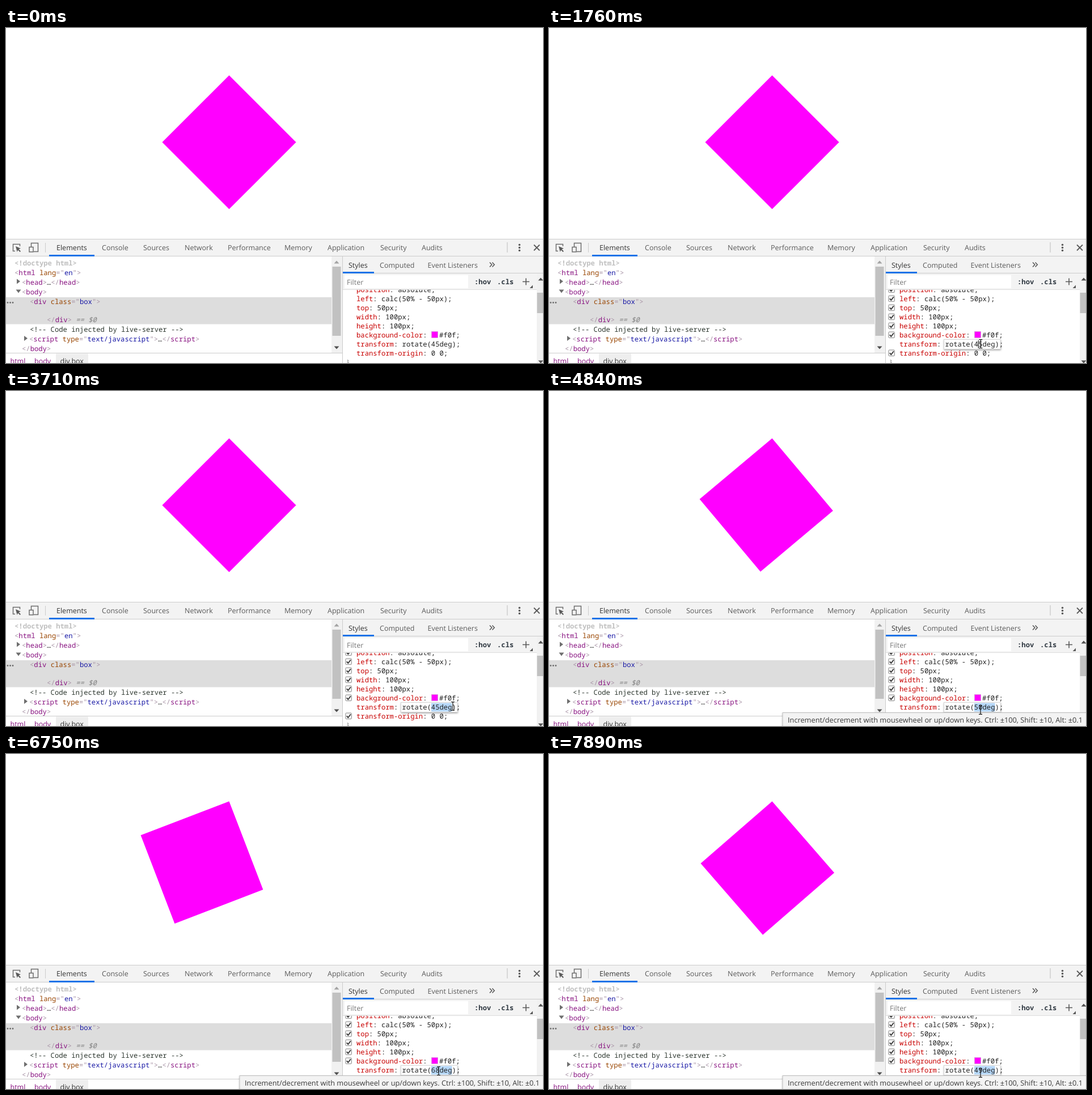
Write an HTML page that moves like this. It is 947 by 591 pixels and loops after 8 s.

```html
<!DOCTYPE html>
<html lang="en">
<head>
<meta charset="utf-8">
<style>
html, body { margin: 0; width: 100%; height: 100%; overflow: hidden; background: #fff; }
svg { display: block; width: 947px; height: 591px; }
text { white-space: pre; text-rendering: geometricPrecision; font: 12.5px "Open Sans", "Noto Sans", sans-serif; fill: #5a5a5a; }
text.m { font: 12.21px "Noto Sans Mono", "DejaVu Sans Mono", monospace; fill: #222; }
.on { fill: #333; }
.p { fill: #a894a6; }
.t { fill: #881280; }
.a { fill: #994500; }
.v { fill: #1a1aa6; }
.k { fill: #c80000; }
.c { fill: #2b352d; }
.d { fill: #c0c0c0; font-weight: 600; }
.i { fill: #808080; font-style: italic; }
.b { fill: #303942; font-weight: 600; }
</style>
</head>
<body>
<svg id="stage" viewBox="0 0 947 591"></svg>
<script>
const svg = document.getElementById('stage');
const CH = 7.326;      // code character width
const VALUE_X = 698.6; // left edge of the transform value
const LOOP = 8000;

const esc = s => s.replace(/&/g, '&amp;').replace(/</g, '&lt;');
const rect = (x, y, w, h, fill, more = '') =>
  `<rect x="${x}" y="${y}" width="${w}" height="${h}" fill="${fill}" ${more}/>`;
const path = (d, fill, stroke = 'none', w = 1) =>
  `<path d="${d}" fill="${fill}" stroke="${stroke}" stroke-width="${w}"/>`;
const ui = (x, y, s, cls = '') => `<text x="${x}" y="${y}" class="${cls}">${esc(s)}</text>`;
// Code line: alternating class and text
const code = (x, y, ...parts) => {
  let out = '';
  for (let i = 0; i < parts.length; i += 2)
    out += `<tspan class="${parts[i]}">${esc(parts[i + 1])}</tspan>`;
  return `<text class="m" x="${x}" y="${y}">${out}</text>`;
};
const dots = (x, y, dx, dy, r, fill) => [-1, 0, 1].map(i =>
  `<circle cx="${x + i * dx}" cy="${y + i * dy}" r="${r}" fill="${fill}"/>`).join('');

function toolbar() {
  const tabs = [['Elements', 89], ['Console', 169], ['Sources', 242], ['Network', 315],
    ['Performance', 391], ['Memory', 491], ['Application', 567], ['Security', 660], ['Audits', 733]];
  return rect(0, 372, 947, 31, '#f3f3f3') + rect(0, 372, 947, 1, '#cbcbcb') +
    rect(0, 402, 947, 1, '#cbcbcb') + rect(76, 400, 80, 3, '#1a73e8') +
    path('M16 393.5H12.5V381.5H24.5V385', 'none', '#6e6e6e', 1.5) +
    path('M17 385l9 4-3.5 1.3 3.5 3.5-1.4 1.4-3.5-3.5-1.5 3.3z', '#5a5a5a') +
    path('M44.5 386V379.5H56.5V394.5H49', 'none', '#6e6e6e', 1.5) +
    path('M41 386.5h7v8.5h-7z', '#f3f3f3', '#6e6e6e', 1.5) +
    rect(69, 379, 1, 17, '#ccc') + rect(883.5, 378, 1, 18, '#bbb') +
    dots(905.5, 387.5, 0, 5, 1.8, '#5a5a5a') +
    path('M931 382.5l10 10M941 382.5l-10 10', 'none', '#5a5a5a', 1.8) +
    tabs.map(([s, x], i) => ui(x, 392, s, i ? '' : 'on')).join('');
}

function tree() {
  return rect(0, 403, 574, 170, '#fff') + rect(0, 475, 574, 47.5, '#ddd') +
    dots(7.5, 484.5, 4.5, 0, 1.4, '#6e6e6e') +
    path('M19 442.5l6 4.5-6 4.5zM32 543l6 4.5-6 4.5zM17.5 461.5h9l-4.5 6z', '#6e6e6e') +
    code(15, 419, 'd', '<!doctype html>') +
    code(15, 436, 'p', '<', 't', 'html ', 'a', 'lang', 'p', '="', 'v', 'en', 'p', '">') +
    code(28, 453, 'p', '<', 't', 'head', 'p', '>', '', '…', 'p', '</', 't', 'head', 'p', '>') +
    code(28, 469.5, 'p', '<', 't', 'body', 'p', '>') +
    code(42, 487, 'p', '<', 't', 'div ', 'a', 'class', 'p', '="', 'v', 'box', 'p', '">') +
    code(72, 519, 'p', '</', 't', 'div', 'p', '>', 'i', ' == $0') +
    code(42, 536, 'c', '<!-- Code injected by live-server -->') +
    code(41, 553, 'p', '<', 't', 'script ', 'a', 'type', 'p', '="', 'v', 'text/javascript',
      'p', '">', '', '…', 'p', '</', 't', 'script', 'p', '>') +
    code(28, 570, 'p', '</', 't', 'body', 'p', '>') +
    rect(574, 403, 19, 170, '#f1f1f1') + rect(575.5, 421, 15, 122, '#c1c1c1') +
    path('M578.5 415.5h9l-4.5-5z', '#a3a3a3') + path('M578.5 561.5h9l-4.5 5z', '#505050') +
    rect(0, 573, 593, 18, '#fff') + rect(0, 573, 593, 1, '#ccc') + rect(88, 574.5, 57, 17, '#eee') +
    ui(7.5, 592, 'html', 't') + ui(50, 592, 'body', 't') + ui(95.5, 592, 'div.box', 'on');
}

function styles() {
  const rules = [['position', 'absolute'], ['left', 'calc(50% - 50px)'], ['top', '50px'],
    ['width', '100px'], ['height', '100px']];
  const tick = i => {
    const y = 456 + 16 * i;
    return `<g id="tick${i}">` + rect(598.8, y, 10.6, 10.6, '#f4f4f4', 'rx="1.5" stroke="#8a8a8a"') +
      path(`M600.8 ${y + 5.4}l2.5 2.8 4.6-6`, 'none', '#333', 1.8) + '</g>';
  };
  return rect(593, 403, 354, 188, '#fff') +
    '<clipPath id="list"><rect x="594" y="462" width="342" height="129"/></clipPath><g clip-path="url(#list)">' +
    rules.map(([k, v], i) => code(618, 466 + 16 * i, 'k', k, '', `: ${v};`)).join('') +
    code(618, 546, 'k', 'background-color', '', ':') +
    rect(750.5, 535.5, 11, 11, '#f0f', 'stroke="#c9a0c9" stroke-width=".6"') + code(764, 546, '', '#f0f;') +
    code(618, 562, 'k', 'transform', '', ':') +
    code(618, 578, 'k', 'transform-origin', '', ': 0 0;') + code(598, 594, 'i', '}') +
    `<g id="ticks">${[0, 1, 2, 3, 4, 5, 6, 7].map(tick).join('')}</g></g>` +
    rect(594, 403, 353, 30, '#f3f3f3') + rect(594, 432, 353, 1, '#ccc') + rect(594, 430, 55, 3, '#1a73e8') +
    ui(604, 422.5, 'Styles', 'on') + ui(659, 422.5, 'Computed') + ui(743.5, 422.5, 'Event Listeners') +
    path('M853 413.5l3.8 4-3.8 4M857.5 413.5l3.8 4-3.8 4', 'none', '#5a5a5a', 1.6) +
    rect(594, 433, 342, 29, '#f3f3f3') + rect(597, 436, 218, 23, '#fff') + rect(594, 461, 342, 1, '#ddd') +
    `<text x="601" y="452.5" style="fill:#777">Filter</text>` +
    code(826, 452, 'b', ':hov') + code(866, 452, 'b', '.cls') +
    path('M911 447.5h12M917 441.5v12', 'none', '#5a5a5a', 1.6) + path('M929 453.5v5.5h-5.5z', '#5a5a5a') +
    rect(936, 433, 11, 158, '#f1f1f1') + rect(936.5, 467, 11, 36, '#c1c1c1') +
    path('M938.5 445.5h9l-4.5-5zM938.5 586.5h9l-4.5 5z', '#505050') +
    rect(593, 403, 1, 188, '#ccc');
}

svg.innerHTML =
  '<defs><filter id="soft" x="-20%" y="-60%" width="140%" height="230%">' +
  '<feDropShadow dx="0.5" dy="1.5" stdDeviation="1.8" flood-opacity=".38"/></filter></defs>' +
  rect(0, 0, 947, 591, '#fff') +
  '<rect id="box" width="167" height="167" fill="#f0f"/>' +
  toolbar() + tree() + styles() +
  `<g id="edit">${rect(696.5, 549.5, 99.5, 17, '#fff', 'stroke="#ccc" stroke-width=".7" filter="url(#soft)"')}</g>` +
  rect(0, 550.5, 0, 15, '#b5d7f8', 'id="sel"') +
  code(VALUE_X, 562, '', 'rotate(', 'num', '45', '', 'deg);') +
  rect(0, 551, 1, 14, '#000', 'id="caret"') +
  `<g id="tip">${rect(412, 567.5, 540, 30, '#f3f3f3', 'stroke="#bdbdbd" filter="url(#soft)"')}
   <text x="421" y="584.5" style="font-size:12.77px;fill:#3a3a3a">Increment/decrement with mousewheel or up/down keys. Ctrl: ±100, Shift: ±10, Alt: ±0.1</text></g>` +
  `<g id="beam">${path('M-3 -7.5h2.2l.8 .8 .8 -.8h2.2M0 -7v14M-3 7.5h2.2l.8 -.8 .8 .8h2.2', 'none', '#111', 1.2)}</g>` +
  `<g id="arrow">${path('M0 0v15l3.5-3.2 2.4 5.4 2.3-1-2.4-5.2h4.7z', '#fff', '#000', 1)}</g>`;

const $ = id => document.getElementById(id);
const num = svg.querySelector('.num');

// Wheel bursts: start, end, angle before, angle after, number of steps
const bursts = [[4000, 4000, 45, 46, 1], [4270, 4270, 46, 47, 1], [4740, 4940, 47, 52, 5],
  [5200, 5350, 52, 57, 4], [5580, 5580, 57, 58, 1], [5670, 6100, 58, 69, 9], [6330, 6420, 69, 72, 3],
  [6700, 6850, 72, 66, 4], [7080, 7270, 66, 60, 5], [7420, 7890, 60, 49, 9]];

function angleAt(t) {
  let deg = 45;
  for (const [t0, t1, a, b, n] of bursts) {
    if (t < t0) break;
    const step = t1 > t0 ? Math.floor((t - t0) / (t1 - t0) * (n - 1) + 1e-6) + 1 : 1;
    deg = Math.round(a + (b - a) * Math.min(1, step / n));
  }
  return deg;
}

// Pointer: time, x, y
const route = [[40, 938, 584], [300, 870, 572], [560, 790, 562], [790, 763, 558], [1940, 761, 557],
  [2170, 761, 557], [2510, 789, 556], [3710, 788, 556], [3760, 788, 556], [3940, 761, 562], [4970, 761, 563],
  [5200, 762, 560], [5530, 762, 559], [6750, 763, 559], [7080, 763, 560], [7420, 761, 562], [8000, 761, 563]];

function pointerAt(t) {
  const i = route.findIndex(p => p[0] > t);
  if (i < 1) return route[0].slice(1);
  const [t0, x0, y0] = route[i - 1], [t1, x1, y1] = route[i];
  const u = (t - t0) / (t1 - t0);
  return [x0 + (x1 - x0) * u, y0 + (y1 - y0) * u];
}

const show = (id, on) => { $(id).style.display = on ? '' : 'none'; };

function draw(t) {
  const deg = angleAt(t);
  $('box').setAttribute('transform', `translate(393.5 83.4) rotate(${deg})`);
  // The field runs a touch ahead of the page
  num.textContent = t >= 5530 && t < 7000 ? angleAt(t + 50) : deg;

  show('ticks', t >= 90);
  show('tick6', t < 1000);
  show('edit', t >= 1000);

  const all = t >= 1000 && t < 1400, part = t >= 3710;
  show('sel', all || part);
  $('sel').setAttribute('x', VALUE_X + (all ? 0 : 7 * CH));
  $('sel').setAttribute('width', (all ? 13 : 5) * CH);

  show('caret', t >= 1400 && t < 3710 && !(t >= 2840 && t < 3150));
  $('caret').setAttribute('x', VALUE_X + (t < 2420 ? 8 : 12) * CH - 0.5);

  show('tip', t >= 3950);

  const at = `translate(${pointerAt(t).map(v => v.toFixed(1)).join(' ')})`;
  $('beam').setAttribute('transform', at);
  $('arrow').setAttribute('transform', at);
  show('arrow', t >= 40 && t < 520);
  show('beam', t >= 520);
}

const start = performance.now();
function frame() {
  draw((performance.now() - start) % LOOP);
  requestAnimationFrame(frame);
}
frame();
</script>
</body>
</html>
```
